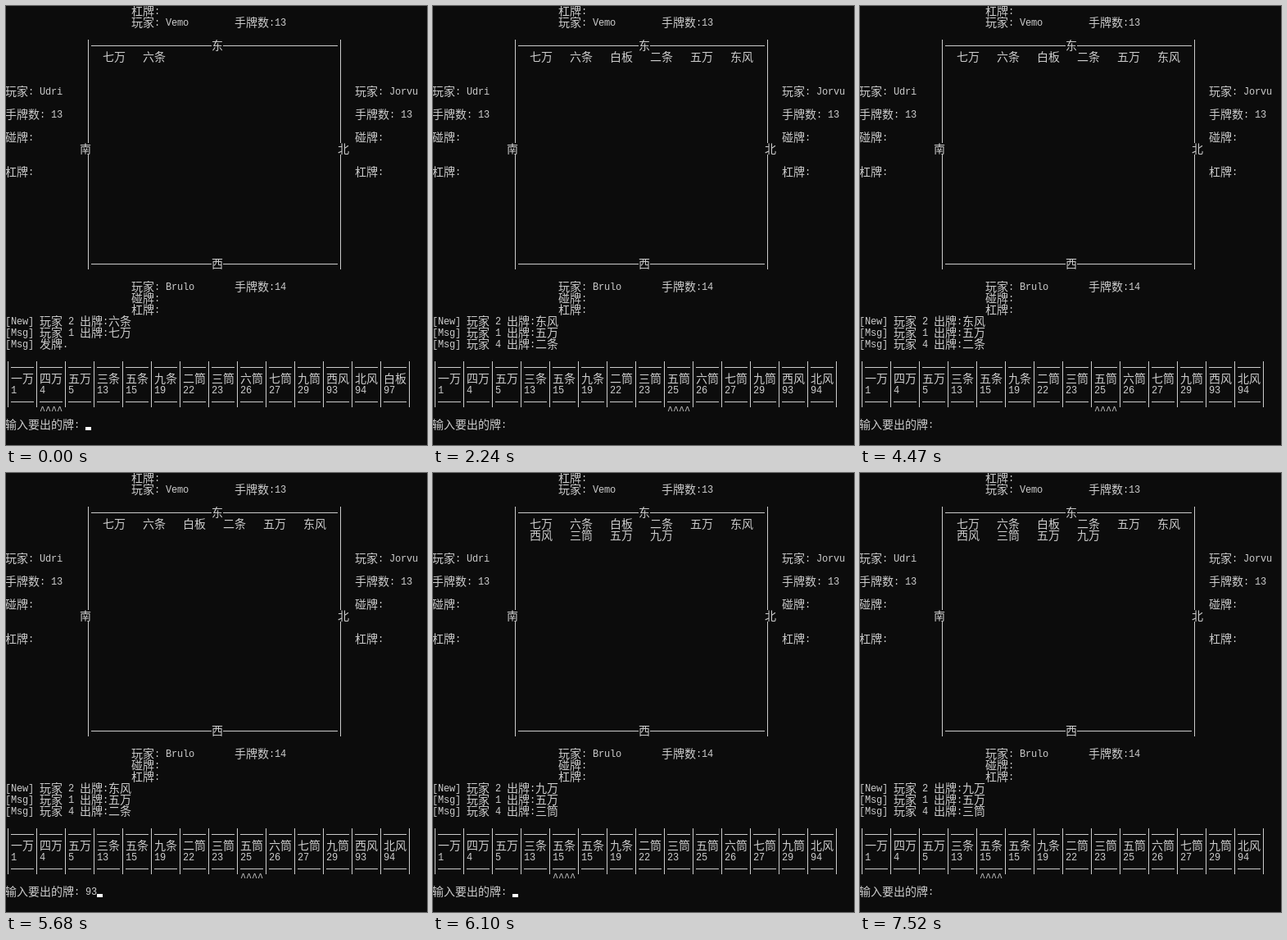
Write an HTML page with a canvas that moves like this. It is 514 by 535 pixels and loops after 8 s.

```html
<!DOCTYPE html>
<html lang="zh-CN">
<head>
<meta charset="utf-8">
<title>麻将</title>
<style>
html, body { margin: 0; width: 100%; height: 100%; overflow: hidden; background: #0c0c0c; }
canvas { display: block; }
</style>
</head>
<body>
<canvas id="screen" width="514" height="535"></canvas>
<script>
const ctx = document.getElementById('screen').getContext('2d');
const W = 514, H = 535, CW = 7, CH = 14, LOOP = 8000;
const BG = '#0c0c0c', FG = '#cccccc';
const LATIN = '12px "Liberation Mono", "DejaVu Sans Mono", monospace';
const HAN = '300 14px "Noto Sans CJK SC", "Noto Sans CJK", sans-serif';
const PROMPT = '输入要出的牌: ';

const turns = [
  {
    table: ['七万 六条'],
    log: ['[New] 玩家 2 出牌:六条', '[Msg] 玩家 1 出牌:七万', '[Msg] 发牌.'],
    hand: '一万 四万 五万 三条 五条 九条 二筒 三筒 六筒 七筒 九筒 西风 北风 白板',
    drawn: 1
  },
  {
    table: ['七万 六条 白板 二条 五万 东风'],
    log: ['[New] 玩家 2 出牌:东风', '[Msg] 玩家 1 出牌:五万', '[Msg] 玩家 4 出牌:二条'],
    hand: '一万 四万 五万 三条 五条 九条 二筒 三筒 五筒 六筒 七筒 九筒 西风 北风',
    drawn: 8
  },
  {
    table: ['七万 六条 白板 二条 五万 东风', '西风 三筒 五万 九万'],
    log: ['[New] 玩家 2 出牌:九万', '[Msg] 玩家 1 出牌:五万', '[Msg] 玩家 4 出牌:三筒'],
    hand: '一万 四万 五万 三条 五条 五条 九条 二筒 三筒 五筒 六筒 七筒 九筒 北风',
    drawn: 4
  }
];

const trace = [
  '---> <CCard at 0x1b8a4fb5508 三筒> CardType.TONG_3',
  '---> <CCard at 0x1b8a4faf488 五万> CardType.WAN_5',
  '---> <CCard at 0x1b8a4faf848 九万> CardType.WAN_9'
];

// start time, turn, typed text, cursor shown, trace shown
const steps = [
  [0, 0, '', 1], [190, 0, '', 0], [410, 0, '9', 1], [820, 0, '97', 0], [1210, 0, '97', 1],
  [1410, 1, '', 1], [2240, 1, '', 0], [2850, 1, '', 1], [3470, 1, '', 0], [3860, 1, '', 1],
  [4470, 1, '', 0], [4880, 1, '', 1], [5490, 1, '', 0], [5680, 1, '93', 1], [5920, 1, '93', 0, 1],
  [6100, 2, '', 1], [6510, 2, '', 0], [7110, 2, '', 1], [7520, 2, '', 0]
];

let scrolled = 0;
const colX = col => col * CW - 1;
const rowY = row => (row - scrolled) * CH - 1;

function put(col, row, text) {
  const y = rowY(row);
  for (const ch of text) {
    const x = colX(col), wide = ch > '\u2e7f';
    if (ch === '-') {
      ctx.fillRect(x, y + 7, CW, 1);
    } else if (ch === '|') {
      ctx.fillRect(x + 3, y, 1, CH);
    } else if (ch !== ' ') {
      ctx.font = wide ? HAN : LATIN;
      ctx.fillText(ch, x + (wide ? CW : CW / 2), y + (wide ? 12 : ch === '^' ? 8 : 11));
    }
    col += wide ? 2 : 1;
  }
}

function cardId(card) {
  const suit = '万条筒'.indexOf(card[1]);
  if (suit >= 0) return suit * 10 + '一二三四五六七八九'.indexOf(card[0]) + 1;
  return 91 + '东南西北中发白'.indexOf(card[0]);
}

function drawSide(col, name) {
  put(col, 7, '玩家: ' + name);
  put(col, 9, '手牌数: 13');
  put(col, 11, '碰牌:');
  put(col, 14, '杠牌:');
}

function drawBoard(table) {
  put(22, 0, '杠牌:');
  put(22, 1, '玩家: Vemo');
  put(40, 1, '手牌数:13');
  drawSide(0, 'Udri');
  drawSide(61, 'Jorvu');

  const edge = wind => '|' + '-'.repeat(21) + wind + '-'.repeat(20) + '|';
  put(14, 3, edge('东'));
  for (let row = 4; row < 22; row++) {
    const mid = row === 12;
    put(mid ? 13 : 14, row, mid ? '南' : '|');
    put(58, row, mid ? '北' : '|');
  }
  put(14, 22, edge('西'));
  table.forEach((line, r) =>
    line.split(' ').forEach((card, i) => put(17 + i * 7, 4 + r, card)));

  put(22, 24, '玩家: Brulo');
  put(40, 24, '手牌数:14');
  put(22, 25, '碰牌:');
  put(22, 26, '杠牌:');
}

function drawHand(hand, drawn) {
  const cards = hand.split(' ');
  const rule = '|----'.repeat(cards.length) + '|';
  put(0, 31, rule);
  put(0, 32, '|' + cards.join('|') + '|');
  put(0, 33, '|' + cards.map(c => String(cardId(c)).padEnd(4)).join('|') + '|');
  put(0, 34, rule);
  put(drawn * 5 + 1, 35, '^^^^');
}

function render(now) {
  const t = now % LOOP;
  const [, index, typed, cursor, traced] = steps.filter(s => s[0] <= t).pop();
  const turn = turns[index];
  scrolled = traced ? 1 : 0;

  ctx.fillStyle = BG;
  ctx.fillRect(0, 0, W, H);
  ctx.fillStyle = FG;
  ctx.textAlign = 'center';
  drawBoard(turn.table);
  turn.log.forEach((line, i) => put(0, 27 + i, line));
  drawHand(turn.hand, turn.drawn);
  put(0, 36, PROMPT + typed);
  if (traced) trace.forEach((line, i) => put(0, 37 + i, line));
  if (cursor) {
    ctx.fillStyle = '#ffffff';
    ctx.fillRect(colX(14 + typed.length), rowY(36) + 10, CW, 4);
  }
}

const start = performance.now();
function tick() {
  render(Math.max(0, performance.now() - start));
  requestAnimationFrame(tick);
}
tick();
</script>
</body>
</html>
```
